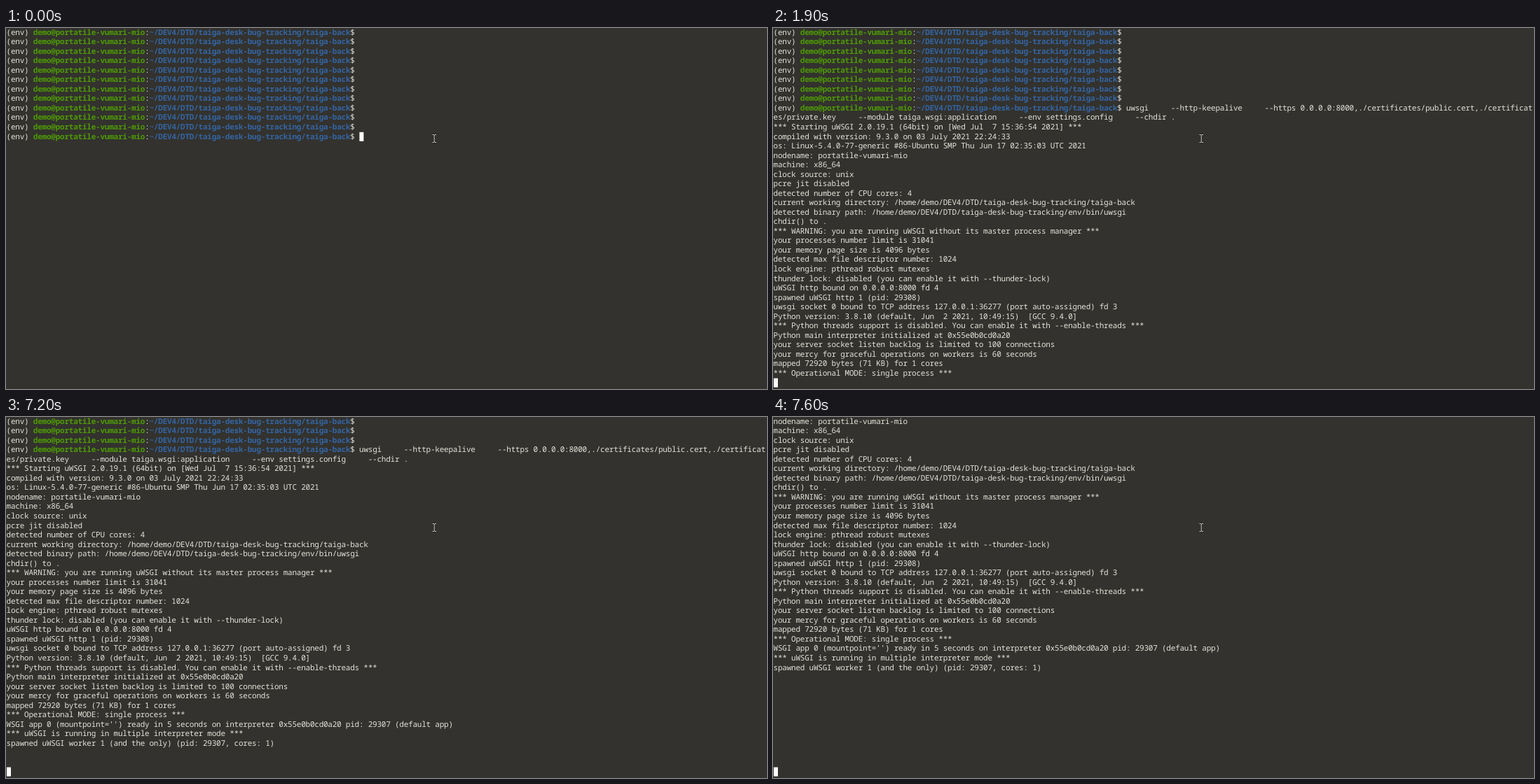
An HTML page for the animation above (8000 ms loop, 1086 by 516 pixels).

```html
<!DOCTYPE html>
<html lang="en">
<head>
<meta charset="utf-8">
<title>Terminal</title>
<style>
  html, body { margin: 0; width: 100%; height: 100%; overflow: hidden; background: #33322e; }
  #term {
    --col: 6.372px;
    --row: 13.53px;
    position: relative;
    width: 1086px;
    height: 516px;
    overflow: hidden;
  }
  #screen, #cursor { position: absolute; left: .6px; top: -.3px; }
  #screen {
    margin: 0;
    color: #e2e4da;
    font: 11px/var(--row) "Noto Sans Mono", "DejaVu Sans Mono", monospace;
    letter-spacing: calc(var(--col) - .6em);
    font-variant-ligatures: none;
    text-rendering: geometricPrecision;
    white-space: pre;
  }
  #screen .user { color: #4e9a06; }
  #screen .path { color: #3465a4; }
  #cursor { width: var(--col); height: var(--row); background: #fff; }
  #mouse { position: absolute; left: 606px; top: 150px; }
</style>
</head>
<body>
<div id="term">
  <pre id="screen"></pre>
  <div id="cursor"></div>
  <svg id="mouse" width="10" height="16" fill="none">
    <defs><path id="beam" d="M2.5 2.5H4.5L5.2 3.2L6 2.5H8M5.2 3V13M2.5 13.5H4.5L5.2 12.8L6 13.5H8"/></defs>
    <use href="#beam" stroke="#22211f" stroke-width="2.4"/>
    <use href="#beam" stroke="#d0d0cc"/>
  </svg>
</div>
<script>
const LOOP = 8000, ROWS = 38, COL = 6.372, ROW = 13.53;
const user = "demo", host = "portatile-vumari-mio";
const project = "DEV4/DTD/taiga-desk-bug-tracking";
const prompt = `(env) <b class="user">${user}@${host}</b>:<b class="path">~/${project}/taiga-back</b>$ `;
const command = [
  "uwsgi     --http-keepalive     --https 0.0.0.0:8000,./certificates/public.cert,./certificat",
  "es/private.key     --module taiga.wsgi:application     --env settings.config     --chdir ."
];
const output = `*** Starting uWSGI 2.0.19.1 (64bit) on [Wed Jul  7 15:36:54 2021] ***
compiled with version: 9.3.0 on 03 July 2021 22:24:33
os: Linux-5.4.0-77-generic #86-Ubuntu SMP Thu Jun 17 02:35:03 UTC 2021
nodename: ${host}
machine: x86_64
clock source: unix
pcre jit disabled
detected number of CPU cores: 4
current working directory: /home/${user}/${project}/taiga-back
detected binary path: /home/${user}/${project}/env/bin/uwsgi
chdir() to .
*** WARNING: you are running uWSGI without its master process manager ***
your processes number limit is 31041
your memory page size is 4096 bytes
detected max file descriptor number: 1024
lock engine: pthread robust mutexes
thunder lock: disabled (you can enable it with --thunder-lock)
uWSGI http bound on 0.0.0.0:8000 fd 4
spawned uWSGI http 1 (pid: 29308)
uwsgi socket 0 bound to TCP address 127.0.0.1:36277 (port auto-assigned) fd 3
Python version: 3.8.10 (default, Jun  2 2021, 10:49:15)  [GCC 9.4.0]
*** Python threads support is disabled. You can enable it with --enable-threads ***
Python main interpreter initialized at 0x55e0b0cd0a20
your server socket listen backlog is limited to 100 connections
your mercy for graceful operations on workers is 60 seconds
mapped 72920 bytes (71 KB) for 1 cores
*** Operational MODE: single process ***
WSGI app 0 (mountpoint='') ready in 5 seconds on interpreter 0x55e0b0cd0a20 pid: 29307 (default app)
*** uWSGI is running in multiple interpreter mode ***
spawned uWSGI worker 1 (and the only) (pid: 29307, cores: 1)`.split("\n");

const idle = Array(12).fill(prompt);
const entered = [...idle.slice(1), prompt + command[0], command[1]];
const session = [...entered, ...output];

// Output rows printed so far, blank Enter presses included
const printed = [[1800, 21], [1900, 27], [6300, 30], [6800, 31],
                 [7200, 32], [7400, 36], [7500, 38], [7600, 40]];

function stateAt(t) {
  if (t < 600) return { rows: idle, row: 11, col: 79 };
  if (t < 1800) return { rows: entered, row: 12, col: 90, hidden: t < 700 };
  const count = printed.filter(([at]) => at <= t).pop()[1];
  const row = entered.length + count;
  return { rows: session.slice(0, row), row, col: 0 };
}

const screen = document.getElementById("screen");
const cursor = document.getElementById("cursor");
let shown = "";

function draw(now) {
  const { rows, row, col, hidden } = stateAt(now % LOOP);
  const top = Math.max(0, row - ROWS + 1);
  const html = rows.slice(top).join("\n");
  if (html !== shown) screen.innerHTML = shown = html;
  cursor.style.transform = `translate(${col * COL}px, ${(row - top) * ROW}px)`;
  cursor.style.visibility = hidden ? "hidden" : "visible";
}

const start = performance.now();
function tick() {
  draw(performance.now() - start);
  requestAnimationFrame(tick);
}
tick();
</script>
</body>
</html>
```
